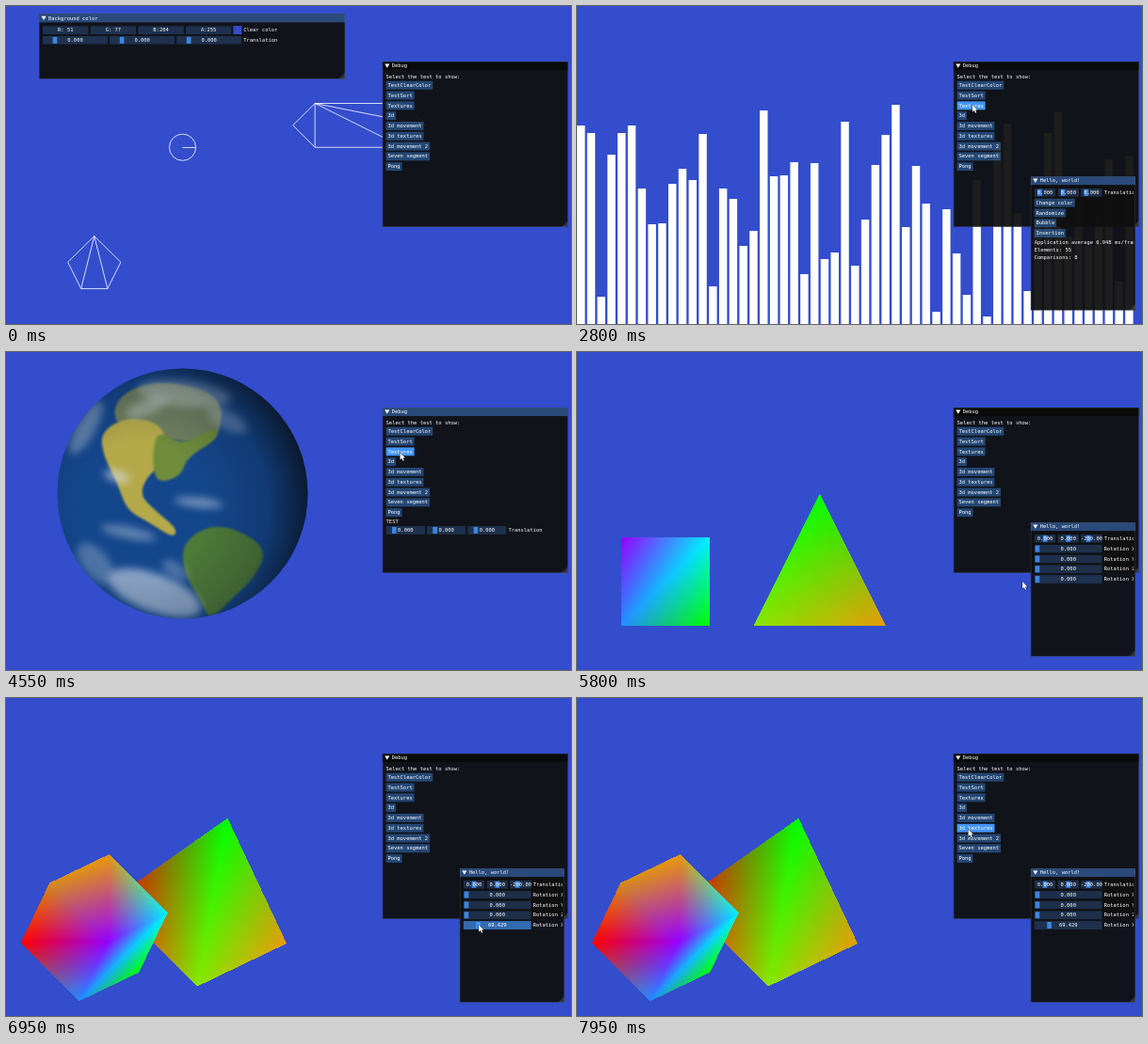
These frames come from a looping animation (600x338 px, 8 s). An HTML page with a canvas:

```html
<!DOCTYPE html>
<html>
<head>
<meta charset="utf-8">
<style>
html, body { margin: 0; overflow: hidden; background: #334dcc; }
canvas { display: block; width: 600px; height: 338px; }
</style>
</head>
<body>
<canvas id="stage" width="600" height="338"></canvas>
<script>
const ctx = document.getElementById('stage').getContext('2d');
const LOOP = 8000, SX = 600 / 1280, SY = 338 / 720;
const ACCENT = a => `rgba(66,150,250,${a})`;
const clamp = v => Math.max(0, Math.min(1, v));
const smooth = v => { v = clamp(v); return v * v * (3 - 2 * v); };

// The interface is laid out on a 1280 x 720 screen, the rest in stage pixels.
const screenSpace = () => ctx.setTransform(SX, 0, 0, SY, 0, 0);
const stageSpace = () => ctx.setTransform(1, 0, 0, 1, 0, 0);

// ---------- mouse ----------
const PATH = [ // time, x, y
  [1900, 480, 345], [2200, 418, 94], [2350, 418, 94], [2600, 420, 105],
  [3950, 420, 105], [4200, 418.5, 107], [4550, 418.5, 107], [4800, 408, 115],
  [5600, 408, 115], [5800, 473, 244], [6200, 488.5, 241], [6450, 488.5, 241],
  [6900, 502, 241], [7300, 502, 241], [7900, 415.5, 139.5], [8000, 415.5, 139.5]];
let mouse = null, dragging = false;

function mouseAt(t) {
  const i = PATH.findIndex(p => p[0] > t);
  if (i < 1) return null;
  const [a, b] = [PATH[i - 1], PATH[i]], k = smooth((t - a[0]) / (b[0] - a[0]));
  return { x: a[1] + (b[1] - a[1]) * k, y: a[2] + (b[2] - a[2]) * k };
}

function over(x, y, w, h) {
  if (!mouse) return false;
  const dx = mouse.x / SX - x, dy = mouse.y / SY - y;
  return dx >= 0 && dx < w && dy >= 0 && dy < h;
}

function drawMouse() {
  if (!mouse) return;
  ctx.translate(mouse.x, mouse.y);
  ctx.beginPath();
  [[0, 0], [0, 7.6], [1.8, 6], [3, 8.8], [4.3, 8.2], [3.1, 5.5], [5.4, 5.4]].forEach(p => ctx.lineTo(...p));
  ctx.closePath();
  ctx.lineWidth = .8;
  ctx.strokeStyle = '#000';
  ctx.fillStyle = '#fff';
  ctx.stroke();
  ctx.fill();
  stageSpace();
}

// ---------- widgets ----------
function rect(x, y, w, h, color) {
  ctx.fillStyle = color;
  ctx.fillRect(x, y, w, h);
}

function text(s, x, y) {
  ctx.font = '11.63px "DejaVu Sans Mono", monospace';
  ctx.fillStyle = '#fff';
  ctx.fillText(s, x, y + 10);
}

function panel(x, y, w, h, title, active, content) {
  ctx.save();
  rect(x, y, w, h, 'rgba(15,15,15,.94)');
  rect(x, y, w, 19, active ? '#294a7a' : '#0a0a0a');
  ctx.strokeStyle = 'rgba(110,110,128,.5)';
  ctx.lineWidth = 1;
  ctx.strokeRect(x + .5, y + .5, w - 1, h - 1);
  ctx.fillStyle = '#fff';
  ctx.beginPath();
  ctx.moveTo(x + 5, y + 5); ctx.lineTo(x + 16, y + 5); ctx.lineTo(x + 10.5, y + 14);
  ctx.fill();
  ctx.fillStyle = 'rgba(120,130,150,.3)';
  ctx.beginPath();
  ctx.moveTo(x + w, y + h - 14); ctx.lineTo(x + w, y + h); ctx.lineTo(x + w - 14, y + h);
  ctx.fill();
  text(title, x + 21, y + 3);
  ctx.beginPath();
  ctx.rect(x, y, w - 4, h);
  ctx.clip();
  content(x + 8, y + 27);
  ctx.restore();
}

function button(label, x, y) {
  const w = label.length * 7 + 8;
  rect(x, y, w, 19, ACCENT(over(x, y, w, 19) ? 1 : .4));
  text(label, x + 4, y + 3);
}

// A frame with centred text; `at` from 0 to 1 places the slider grab.
function field(value, x, y, w, at, active) {
  ctx.save();
  ctx.beginPath();
  ctx.rect(x, y, w, 19);
  ctx.clip();
  const hot = !dragging && over(x, y, w, 19);
  rect(x, y, w, 19, active ? ACCENT(.67) : hot ? ACCENT(.4) : 'rgba(41,74,122,.54)');
  if (at !== undefined) rect(x + 2 + (w - 14) * at, y + 2, 10, 15, active ? ACCENT(1) : '#3d85e0');
  text(value, x + Math.max(0, (w - 7 * value.length) / 2), y + 3);
  ctx.restore();
}

function translation(x, y, total, places, values = ['0.000', '0.000', '0.000']) {
  const w = (total - 8) / 3;
  values.forEach((v, i) => field(v, x + i * (w + 4), y, w, places[i]));
  text('Translation', x + total + 4, y + 3);
}

const LOW = [.156, .156, .156];
const TESTS = ['TestClearColor', 'TestSort', 'Textures', '3d', '3d movement', '3d textures',
  '3d movement 2', 'Seven segment', 'Pong'];

function debugPanel(active, extra) {
  panel(853, 126, 420, 374, 'Debug', active, (x, y) => {
    text('Select the test to show:', x, y);
    TESTS.forEach((name, i) => button(name, x, y + 17 + 23 * i));
    if (extra) extra(x, y + 17 + 23 * TESTS.length);
  });
}

const helloPanel = content => panel(1028, 386, 237, 303, 'Hello, world!', true, content);

// ---------- wireframes ----------
function fan(points) {
  ctx.beginPath();
  points.forEach(p => ctx.lineTo(...p));
  ctx.closePath();
  points.slice(2, -1).forEach(p => { ctx.moveTo(...points[0]); ctx.lineTo(...p); });
  ctx.stroke();
}

function wireScene() {
  screenSpace();
  ctx.strokeStyle = '#fff';
  ctx.lineWidth = 1.7;
  fan([[200, 521], [260, 580], [230, 640], [170, 640], [140, 580]]);
  fan([[700, 220.5], [900, 220.5], [950, 270], [900, 320], [700, 320], [650, 270]]);
  ctx.beginPath();
  ctx.arc(400, 320, 30, 0, 7);
  ctx.moveTo(400, 320.5); ctx.lineTo(430, 320.5);
  ctx.stroke();
  debugPanel(false);
  panel(75, 18, 693, 147, 'Background color', true, (x, y) => {
    ['R: 51', 'G: 77', 'B:204', 'A:255'].forEach((v, i) => field(v, x + 108 * i, y, 104));
    rect(x + 432, y, 19, 19, '#334dcc');
    text('Clear color', x + 455, y + 3);
    translation(x, y + 23, 451, LOW);
  });
}

// ---------- sorting ----------
const BAR_TOPS = [127, 135, 309, 158, 135, 127, 194, 232, 231, 189, 173, 185, 136, 298, 194, 205, 255, 239,
  111, 181, 180, 166, 285, 167, 269, 262, 123, 276, 227, 169, 137, 105, 235, 170, 210, 325, 216, 263, 307,
  185, 330, 146, 125, 220, 303, 230, 135, 113, 245, 182, 255, 220, 163, 292, 159];

function sortScene() {
  BAR_TOPS.forEach((top, i) => rect(i * 23 * SX, top, 18 * SX, 338 - top, '#fff'));
  screenSpace();
  debugPanel(false);
  helloPanel((x, y) => {
    translation(x, y, 154, LOW);
    ['Change color', 'Randomize', 'Bubble', 'Insertion'].forEach((s, i) => button(s, x, y + 23 * (i + 1)));
    ['Application average 6.948 ms/frame', 'Elements: 55', 'Comparisons: 8']
      .forEach((s, i) => text(s, x, y + 115 + 17 * i));
  });
}

// ---------- globe ----------
function blob(color, ...p) {
  const mid = i => [(p[i][0] + p[(i + 1) % p.length][0]) / 2, (p[i][1] + p[(i + 1) % p.length][1]) / 2];
  ctx.beginPath();
  ctx.moveTo(...mid(p.length - 1));
  p.forEach((q, i) => ctx.quadraticCurveTo(...q, ...mid(i)));
  ctx.fillStyle = color;
  ctx.fill();
}

function cloud(x, y, rx, ry, turn, alpha) {
  ctx.beginPath();
  ctx.ellipse(x, y, rx, ry, turn, 0, 7);
  ctx.fillStyle = `rgba(215,225,235,${alpha})`;
  ctx.fill();
}

function globeScene() {
  ctx.save();
  ctx.beginPath();
  ctx.arc(187.5, 150.5, 133, 0, 7);
  ctx.clip();
  rect(50, 10, 280, 280, '#14468c');
  ctx.filter = 'blur(1px)';
  blob('#6f8060', [112, 75], [120, 45], [160, 30], [215, 40], [232, 62], [222, 98], [190, 95], [150, 90]);
  blob('#b5a94a', [100, 85], [130, 68], [170, 78], [168, 118], [150, 132], [142, 152], [158, 168], [182, 188],
    [178, 198], [150, 180], [128, 168], [118, 138], [104, 112]);
  blob('#6f8c3c', [160, 82], [188, 100], [222, 78], [226, 92], [192, 112], [186, 132], [160, 140], [155, 115]);
  blob('#4e7a38', [186, 205], [214, 184], [246, 188], [278, 210], [264, 240], [240, 262], [216, 286],
    [206, 262], [190, 238]);
  ctx.filter = 'blur(4px)';
  [[158, 256, 52, 20, .35, .6], [95, 225, 26, 14, .9, .3], [85, 80, 10, 32, .5, .4], [118, 132, 14, 6, .3, .6],
    [190, 44, 50, 14, .1, .4], [150, 58, 24, 8, -.4, .4], [205, 160, 26, 5, .1, .5], [130, 192, 30, 6, .2, .4],
    [235, 72, 24, 10, .5, .3], [180, 232, 16, 8, .6, .3]].forEach(c => cloud(...c));
  ctx.filter = 'none';
  const shade = ctx.createRadialGradient(145, 165, 70, 145, 165, 185);
  shade.addColorStop(0, 'rgba(8,16,30,0)');
  shade.addColorStop(.55, 'rgba(8,16,30,.22)');
  shade.addColorStop(1, 'rgba(8,14,24,.9)');
  rect(50, 10, 280, 280, shade);
  ctx.restore();
  screenSpace();
  debugPanel(true, (x, y) => {
    text('TEST', x, y);
    translation(x, y + 17, 273, LOW);
  });
}

// ---------- 3d ----------
const RED = [255, 0, 0], ORANGE = [232, 155, 10], AMBER = [215, 140, 25], LIME = [135, 230, 0],
  GREEN = [0, 255, 0], CYAN = [0, 240, 255], SKY = [35, 140, 255], PURPLE = [150, 0, 255];
const CUBE = {
  at: [200, 520],
  points: [RED, ORANGE, AMBER, ORANGE, SKY, GREEN, PURPLE, CYAN].map((color, i) =>
    ({ pos: [i & 1, i & 2, i & 4].map(bit => bit ? 100 : -100), color })),
  faces: [[4, 7, 6], [4, 7, 5], [6, 3, 7], [6, 3, 2], [0, 6, 4], [0, 6, 2]]
};
const PYRAMID = {
  at: [550, 470],
  points: [
    { pos: [0, 150, -146], color: GREEN }, { pos: [-150, -150, 50], color: LIME },
    { pos: [150, -150, 50], color: ORANGE }, { pos: [-150, -150, -245], color: RED }],
  faces: [[0, 1, 2], [0, 1, 3]]
};
const meshCanvas = Object.assign(document.createElement('canvas'), { width: 340, height: 338 });
const meshCtx = meshCanvas.getContext('2d');
let meshAngle = null;

// Fills one triangle with blended corner colours, keeping the nearest pixels.
function triangle(image, depth, a, b, c) {
  const area = (b.y - c.y) * (a.x - c.x) + (c.x - b.x) * (a.y - c.y);
  const bounds = k => [Math.floor(Math.min(a[k], b[k], c[k])), Math.ceil(Math.max(a[k], b[k], c[k]))];
  const [x0, x1] = bounds('x'), [y0, y1] = bounds('y');
  for (let y = y0; y < y1; y++) for (let x = x0; x < x1; x++) {
    const dx = x + .5 - c.x, dy = y + .5 - c.y;
    const u = ((b.y - c.y) * dx + (c.x - b.x) * dy) / area;
    const v = ((c.y - a.y) * dx + (a.x - c.x) * dy) / area;
    const w = 1 - u - v, i = y * image.width + x;
    if (!(u >= 0 && v >= 0 && w >= 0)) continue;
    const z = u * a.z + v * b.z + w * c.z;
    if (z < depth[i]) continue;
    depth[i] = z;
    for (let k = 0; k < 3; k++) image.data[i * 4 + k] = u * a.color[k] + v * b.color[k] + w * c.color[k];
    image.data[i * 4 + 3] = 255;
  }
}

function drawMeshes(angle) {
  if (angle !== meshAngle) {
    meshAngle = angle;
    const image = meshCtx.createImageData(340, 338), depth = new Float32Array(340 * 338).fill(-1e6);
    const c = Math.cos(angle * Math.PI / 180), s = Math.sin(angle * Math.PI / 180) * Math.SQRT1_2;
    const p = (1 + c) / 2, q = (1 - c) / 2; // turn about the diagonal of x and y
    for (const mesh of [PYRAMID, CUBE]) {
      const v = mesh.points.map(({ pos: [x, y, z], color }) => ({
        x: (mesh.at[0] + p * x + q * y + s * z) * SX,
        y: (mesh.at[1] - q * x - p * y + s * z) * SY,
        z: s * (y - x) + c * z,
        color
      }));
      mesh.faces.forEach(f => triangle(image, depth, ...f.map(i => v[i])));
    }
    meshCtx.putImageData(image, 0, 0);
  }
  ctx.drawImage(meshCanvas, 0, 0);
}

function solidScene(t) {
  const angle = 69.429 * smooth((t - 6450) / 450);
  drawMeshes(angle);
  screenSpace();
  debugPanel(false);
  helloPanel((x, y) => {
    translation(x, y, 154, [.5, .5, .3], ['0.000', '0.000', '-200.000']);
    ['X', 'Y', 'Z', 'XY'].forEach((axis, i) => {
      const value = i === 3 ? angle : 0, row = y + 23 * (i + 1);
      field(value.toFixed(3), x, row, 154, value / 360, i === 3 && dragging);
      text('Rotation ' + axis, x + 158, row + 3);
    });
  });
}

// ---------- loop ----------
function draw(now) {
  const t = now % LOOP;
  mouse = mouseAt(t);
  dragging = t >= 6450 && t < 7275;
  stageSpace();
  rect(0, 0, 600, 338, '#334dcc');
  if (t < 2250) wireScene();
  else if (t < 4000) sortScene();
  else if (t < 4900) globeScene();
  else solidScene(t);
  stageSpace();
  drawMouse();
  requestAnimationFrame(draw);
}
const start = performance.now();
requestAnimationFrame(function first(now) { draw(Math.max(0, now - start)); });
</script>
</body>
</html>
```
